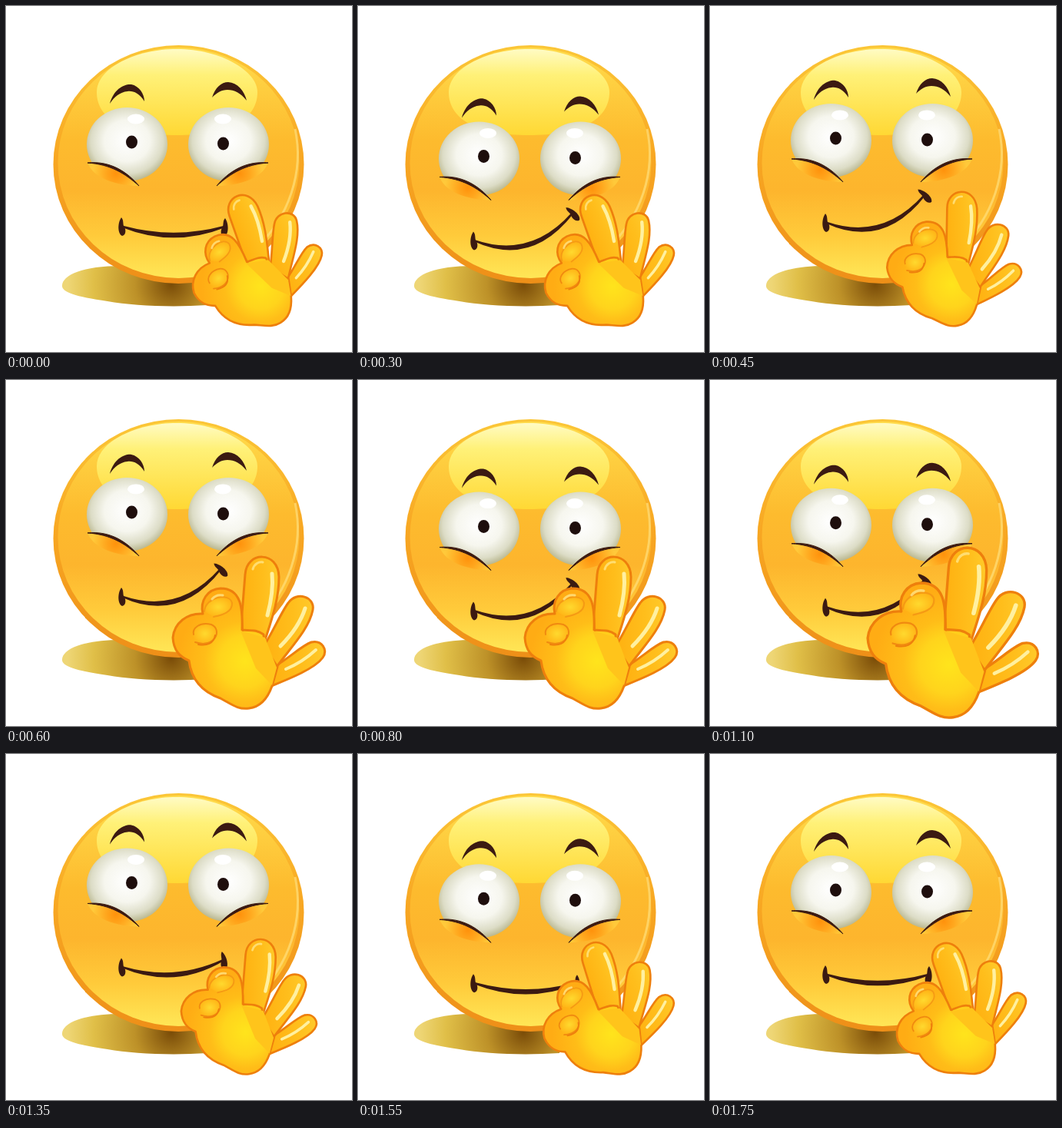
Animation, 450 px wide and 450 px high, one loop 2400 ms. Source, as an HTML page:

```html
<!DOCTYPE html>
<html lang="en">
<head>
<meta charset="utf-8">
<title>Nodding smiley</title>
<style>
html, body { margin: 0; width: 100%; height: 100%; overflow: hidden; background: #fff; }
svg { display: block; width: 100%; height: 100%; }
</style>
</head>
<body>
<svg viewBox="0 0 450 450">
  <defs>
    <linearGradient id="rim" x2="0" y2="1">
      <stop offset="0" stop-color="#fbc637"/>
      <stop offset=".45" stop-color="#f8a823"/>
      <stop offset="1" stop-color="#ee8f18"/>
    </linearGradient>
    <linearGradient id="skin" x2="0" y2="1">
      <stop offset="0" stop-color="#ffdc4c"/>
      <stop offset=".4" stop-color="#fdbb2e"/>
      <stop offset=".62" stop-color="#fdb52d"/>
      <stop offset=".82" stop-color="#ffcb3b"/>
      <stop offset="1" stop-color="#ffe656"/>
    </linearGradient>
    <linearGradient id="shine" x2="0" y2="1">
      <stop offset="0" stop-color="#fffbc4"/>
      <stop offset=".3" stop-color="#fff178"/>
      <stop offset="1" stop-color="#ffd834"/>
    </linearGradient>
    <radialGradient id="shade" gradientUnits="userSpaceOnUse" cx="215" cy="362" r="135">
      <stop offset="0" stop-color="#7a4c08"/>
      <stop offset=".35" stop-color="#bd9128"/>
      <stop offset=".75" stop-color="#e0bf48"/>
      <stop offset="1" stop-color="#eed676"/>
    </radialGradient>
    <radialGradient id="ball" cx=".5" cy=".45" r=".56">
      <stop offset="0" stop-color="#fff"/>
      <stop offset=".5" stop-color="#f6f6ee"/>
      <stop offset=".8" stop-color="#dcdcc6"/>
      <stop offset="1" stop-color="#b5b389"/>
    </radialGradient>
    <radialGradient id="blush" gradientUnits="userSpaceOnUse" cx="143" cy="218" r="30">
      <stop offset="0" stop-color="#ff920c"/>
      <stop offset=".4" stop-color="#ffa51c"/>
      <stop offset="1" stop-color="#ffc93a"/>
    </radialGradient>
    <linearGradient id="finger">
      <stop offset="0" stop-color="#ffb010"/>
      <stop offset=".6" stop-color="#ffbe1c"/>
      <stop offset="1" stop-color="#ffca2a"/>
    </linearGradient>
    <radialGradient id="palm" gradientUnits="userSpaceOnUse" cx="311" cy="366" r="88">
      <stop offset="0" stop-color="#ffe41c"/>
      <stop offset=".38" stop-color="#ffd41c"/>
      <stop offset=".6" stop-color="#ffbd18"/>
      <stop offset="1" stop-color="#ffac14"/>
    </radialGradient>
    <radialGradient id="tip" cx=".5" cy=".5">
      <stop offset="0" stop-color="#ffd92e"/>
      <stop offset="1" stop-color="#ffb617"/>
    </radialGradient>
    <g id="lid">
      <path d="M106 204C112 219 132 233 173 234C158 217 138 202 106 204Z" fill="url(#blush)"/>
      <path d="M106 204C136 201 158 216 173 234C155 218 136 206 106 204Z" fill="#3b1a12" stroke="#3b1a12"/>
    </g>
    <path id="corner" d="M-1-12C-6-5-6 9 0 12C6 11 5 2 2-1C1-5 2-9-1-12Z"/>
  </defs>

  <path d="M73 364C73 350 100 338 150 338L270 350L262 389C215 392 165 390 132 384C90 378 73 372 73 364Z" fill="url(#shade)"/>
  <ellipse cx="224.5" cy="206" rx="163" ry="155" fill="url(#rim)"/>
  <ellipse cx="224.5" cy="204" rx="157" ry="150" fill="url(#skin)"/>
  <path d="M376 160C388 215 368 275 325 315" fill="none" stroke="#ffe07c" stroke-width="3" opacity=".7"/>
  <path d="M118 112C118 80 170 56 222 56C280 56 327 85 327 112C327 150 285 168 222 168C160 168 118 150 118 112Z" fill="url(#shine)"/>

  <g id="face" fill="#3b1a12">
    <path d="M135 127C140 108 154 101 163 102C173 104 180 114 180 124C173 113 165 110 158 111C148 112 141 118 135 127Z"/>
    <path d="M268 119C272 106 280 99 289 99C301 100 310 110 313 123C305 113 297 109 288 109C280 109 274 113 268 119Z"/>
    <g fill="url(#ball)">
      <ellipse cx="157.5" cy="180" rx="52.5" ry="48"/>
      <ellipse cx="289.5" cy="180" rx="52.5" ry="48"/>
    </g>
    <g fill="#fff">
      <ellipse cx="169" cy="147" rx="11" ry="6.5"/>
      <ellipse cx="282" cy="147" rx="11" ry="6.5"/>
    </g>
    <g fill="#1e0e0c">
      <ellipse cx="163.5" cy="177" rx="7.5" ry="8.5"/>
      <ellipse cx="282.5" cy="179" rx="7.5" ry="8.5"/>
    </g>
    <use href="#lid"/>
    <use href="#lid" transform="matrix(-1 0 0 1 447 0)"/>
    <path id="lips" stroke="#3b1a12" stroke-width="2.5"/>
    <use href="#corner" transform="translate(151 287)"/>
    <use href="#corner" id="right"/>
  </g>

  <g id="hand" stroke="#ee7f0c" stroke-width="3" stroke-linejoin="round" stroke-linecap="round">
    <g fill="url(#finger)">
      <path d="M345 398C370 388 402 375 412 361C419 351 411 338 397 341C385 345 368 362 350 372Z"/>
      <path d="M334 348C346 330 358 302 367 290C378 274 402 282 399 299C394 325 368 350 350 376Z"/>
      <path d="M305 328L311 253C313 222 354 222 355 256C355 285 346 310 337 338Z"/>
    </g>
    <path d="M307 325C308 297 306 271 279 271C262 272 252 287 256 304C235 303 219 316 217 335C218 352 226 360 238 365C241 390 256 406 279 414C294 422 302 429 316 427C333 425 341 412 346 398L353 373L336 347L335 331C326 324 316 326 307 325Z" fill="url(#palm)"/>
    <path d="M305 326L337 335L352 374L346 397L325 375Z" fill="#ffc41b" stroke="none"/>
    <g fill="url(#tip)" stroke-width="2">
      <path d="M258 301C259 282 291 276 294 290C295 303 278 306 270 308" stroke="#f59a14"/>
      <path d="M246 341C272 350 282 324 267 318C252 314 242 323 244 331" stroke="#f08a10"/>
    </g>
    <path d="M272 332C270 343 261 346 250 344M307 294C307 306 307 316 308 326" fill="none" stroke-width="2"/>
    <g fill="none" stroke="#fff0a0" stroke-width="5">
      <path d="M346 252C348 272 344 291 340 306"/>
      <path d="M389 297C383 316 369 334 357 346"/>
      <path d="M403 351C391 362 376 371 364 376" stroke-width="4"/>
      <path d="M321 246C323 239 329 236 334 237M268 285C272 280 277 279 282 280" stroke-width="3" opacity=".65"/>
    </g>
  </g>
</svg>
<script>
const LOOP = 2400, STEP = 50, ACTIVE = 1750;
const $ = id => document.getElementById(id);
const ramp = (t, a, b) => Math.min(1, Math.max(0, (t - a) / (b - a)));
const ease = x => (1 - Math.cos(Math.PI * x)) / 2;
const mix = (a, b, k) => a + (b - a) * k;

// four nods per active span, resting at zero
const nod = t => t ? 2.5 - 16 * Math.cos(2 * Math.PI * (4 * t / ACTIVE - 0.2)) : 0;

function handScale(t) {
  if (t < 500 || t > 1350) return 0.88;
  if (t > 1100) return mix(1.12, 0.89, ease(ramp(t, 1100, 1350)));
  return 1 - 0.12 * Math.cos(2 * Math.PI * (t - 500) / 400);
}

function draw(t) {
  $("face").setAttribute("transform", `translate(0 ${nod(t)})`);

  const smile = ramp(t, 0, 250) * (1 - ramp(t, 1100, 1440));
  const x = mix(284, 279, smile), y = mix(287, 251, smile);
  const cx = mix(218, 225, smile), cy = mix(309, 316, smile);
  $("lips").setAttribute("d",
    `M152 287Q${cx} ${cy - 4} ${x} ${y}Q${cx} ${cy + 4} 152 287Z`);
  $("right").setAttribute("transform",
    `translate(${x} ${y + 1}) rotate(${-50 * smile}) scale(-1 1)`);

  const upright = ease(ramp(t, 300, 500)) * (1 - ease(ramp(t, 1350, 1600)));
  $("hand").setAttribute("transform",
    `translate(${mix(322, 316, upright)} ${mix(333, 329, upright)})
     rotate(${-24 * (1 - upright)}) scale(${handScale(t)}) translate(-316 -329)`);
}

function tick() {
  const t = Math.floor(performance.now() % LOOP / STEP) * STEP;
  draw(t < ACTIVE ? t : 0);
  requestAnimationFrame(tick);
}
tick();
</script>
</body>
</html>
```
